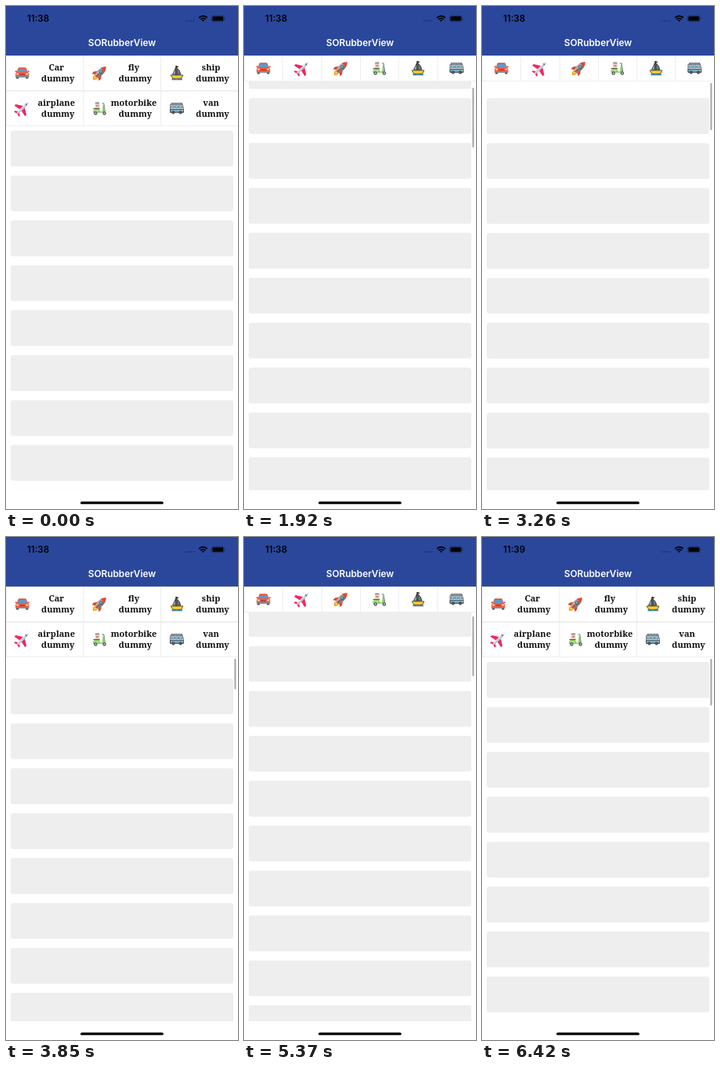
Write an HTML page that moves like this. It is 296 px wide and 640 px high and loops after 6.52 s.

```html
<!DOCTYPE html>
<html lang="en">
<head>
<meta charset="utf-8">
<title>SORubberView</title>
<style>
html, body { margin: 0; width: 100%; height: 100%; overflow: hidden; background: #fff; }
svg { display: block; width: 100vw; height: 100vh; }
.ui { font-family: Inter, "Liberation Sans", sans-serif; font-weight: 600; text-anchor: middle; }
.label { font: 600 11px "Noto Serif", serif; text-anchor: middle; fill: #111; }
.cell { fill: #fff; stroke: #e9e9e9; stroke-width: .7; }
</style>
</head>
<body>
<svg viewBox="0 0 296 640" preserveAspectRatio="none">
  <defs>
    <clipPath id="listClip"><rect y="63" width="296" height="553"/></clipPath>

    <g id="car">
      <path d="M-7.6 4H-4.6V7.2H-7.6ZM4.6 4H7.6V7.2H4.6Z" fill="#444b55"/>
      <path d="M-7.2 0L-5.4-5.6Q-4.9-7-3.6-7H3.6Q4.9-7 5.4-5.6L7.2 0Z" fill="#e9503c"/>
      <path d="M-5.8-1.2L-4.4-5.4H4.4L5.8-1.2Z" fill="#5a9cc9"/>
      <path d="M-9-2.8H-6.8V-1.2H-9ZM6.8-2.8H9V-1.2H6.8Z" fill="#d8432f"/>
      <path d="M-8.6 5.2V1.2Q-8.4-1.2-6.4-1.2H6.4Q8.4-1.2 8.6 1.2V5.2Z" fill="#f05b45"/>
      <path d="M-3.6 1.2H3.6L3 2.8H-3Z" fill="#a83a32"/>
      <rect x="-8.6" y="3.6" width="17.2" height="1.8" rx=".8" fill="#7d8791"/>
      <ellipse cx="-6" cy="1.3" rx="1.6" ry="1.1" fill="#ffe0a0"/>
      <ellipse cx="6" cy="1.3" rx="1.6" ry="1.1" fill="#ffe0a0"/>
    </g>

    <g id="plane" transform="rotate(45)">
      <path d="M0-4L-9.6 2V4.6L0 2.6 9.6 4.6V2Z" fill="#f3265f"/>
      <path d="M0 5.6L-4.4 8.6V10.4L0 9.4 4.4 10.4V8.6Z" fill="#f3265f"/>
      <path d="M0-11.5Q1.6-9 1.6-6V5L.8 9.5H-.8L-1.6 5V-6Q-1.6-9 0-11.5Z" fill="#d5e1ec"/>
      <path d="M0-11.5Q1.6-9 1.6-6V5L.8 9.5H0Z" fill="#b4c5d6"/>
      <path d="M-1.3-7.8H1.3L1-6.6H-1Z" fill="#46627f"/>
    </g>

    <g id="rocket" transform="rotate(45)">
      <path d="M-2.4 5Q-4 9 0 12 4 9 2.4 5Z" fill="#f9a11b"/>
      <path d="M-1.2 5Q-2 8 0 9.6 2 8 1.2 5Z" fill="#ffe067"/>
      <path d="M-3-1L-6.4 4V7.6L-2.4 5ZM3-1L6.4 4V7.6L2.4 5Z" fill="#d8452f"/>
      <path d="M0-11.5Q4-7.5 4-2 4 2 2.6 6H-2.6Q-4 2-4-2-4-7.5 0-11.5Z" fill="#b3adaa"/>
      <path d="M0-11.5Q4-7.5 4-2 4 2 2.6 6H0Z" fill="#827a79"/>
      <path d="M0-11.5Q2.8-8.8 3.6-5.6H-3.6Q-2.8-8.8 0-11.5Z" fill="#e3472f"/>
      <circle cy="-2.4" r="2.2" fill="#464b58"/>
      <circle cy="-2.4" r="1.4" fill="#6bc1ed"/>
      <path d="M-.7 1H.7V7H-.7Z" fill="#c33c2b"/>
    </g>

    <g id="bike">
      <rect x="-5.8" y="-7" width="6" height="6.4" rx="1.2" fill="#e3d6c6"/>
      <path d="M-5.4-7.8H-.4V-6H-5.4Z" fill="#8f8780"/>
      <path d="M-4.4-4.2H-1.4V-2.4H-4.4Z" fill="#e87766"/>
      <path d="M3.2-6.4H5.4L7 4" fill="none" stroke="#66717a" stroke-width="1"/>
      <path d="M-8-.4H.2V.8H-8Z" fill="#55515a"/>
      <path d="M-8.4 5.4Q-8.4.8-5 .8H-.5L.8 4H3.6L4.2-4.4H6L6.6 5.4Z" fill="#84cc57"/>
      <path d="M-7.4 4Q-7 2-4 2H-1.4L-.7 4Z" fill="#b5e391"/>
      <circle cx="-5" cy="6.2" r="2.2" fill="#4b5159"/><circle cx="-5" cy="6.2" r="1" fill="#dde2e5"/>
      <circle cx="6.2" cy="6.2" r="2.2" fill="#4b5159"/><circle cx="6.2" cy="6.2" r="1" fill="#dde2e5"/>
    </g>

    <g id="ship" stroke="#151515" stroke-width=".7" stroke-linejoin="round">
      <path d="M-1.2-9L2-8-1.2-6.8Z" fill="#e24a3c"/>
      <path d="M-1.6-6.6L-5.6 1.8H-1.6Z" fill="#9db0b4"/>
      <path d="M0-6.6Q4.4-3 4.8 1.8H0Z" fill="#6d7d7c"/>
      <path d="M-.9-9V3" fill="none" stroke-width=".9"/>
      <path d="M-7.8 2.6H7.8L5.6 7H-5.2Z" fill="#ffd02e"/>
      <path d="M-6.6 7.6Q-4.4 6.4-2.4 7.6T2 7.6 6.6 7.4V8.8H-6Z" fill="#2f9fe0" stroke-width=".3"/>
    </g>

    <g id="van" stroke="#27313a" stroke-width=".7" stroke-linejoin="round">
      <path d="M-7-6.6H6.6V-5H-7Z" fill="#cfd8dc"/>
      <path d="M-8.4 5V-5H7.2L8.4 0V5Z" fill="#eef2f3"/>
      <path d="M-8.4 1.2H8.4V5H-8.4Z" fill="#78a9c6"/>
      <path d="M-7.2-3.4H-3.2V-.4H-7.2ZM-2.2-3.4H1.6V-.4H-2.2ZM2.6-3.4H6.3L7-.4H2.6Z" fill="#8bd2f2" stroke-width=".5"/>
      <circle cx="-4.6" cy="5.2" r="1.7" fill="#59636b"/>
      <circle cx="4.6" cy="5.2" r="1.7" fill="#59636b"/>
      <path d="M6.8 2H8.1V3.2H6.8Z" fill="#ffd35a" stroke="none"/>
    </g>
  </defs>

  <rect width="296" height="640" fill="#fff"/>
  <g clip-path="url(#listClip)">
    <g id="rows" fill="#eee"></g>
    <rect id="thumb" x="291.4" width="2" rx="1" fill="#000" fill-opacity=".36"/>
  </g>
  <g id="panel"><rect id="panelBack" y="63" width="296" fill="#fff"/></g>

  <rect width="296" height="63" fill="#2a479c"/>
  <text class="ui" id="clock" x="41" y="20" font-size="11.5">11:38</text>
  <g id="dots" fill="#000" fill-opacity=".4"></g>
  <g fill="none" stroke="#000" stroke-width="1.7">
    <path d="M246.2 15Q251.5 10.2 256.8 15M248.2 17.1Q251.5 14.2 254.8 17.1"/>
    <path d="M249.8 18.2Q251.5 16.8 253.2 18.2L251.5 20Z" fill="#000" stroke="none"/>
  </g>
  <rect x="262.3" y="12.2" width="16" height="7.6" rx="2.2" fill="none" stroke="#000" stroke-opacity=".45" stroke-width=".7"/>
  <rect x="263.4" y="13.3" width="13.8" height="5.4" rx="1.3"/>
  <path d="M279.2 14.7Q280.6 16 279.2 17.3Z" fill-opacity=".5"/>
  <text class="ui" x="148" y="51.3" font-size="11.8" fill="#fff">SORubberView</text>
  <rect x="95" y="630.5" width="105.8" height="3.3" rx="1.65"/>
</svg>
<script>
const LOOP = 6520, COL = 296 / 3, HALF = COL / 2, PITCH = 57.15, CONTENT = 3560;
const $ = id => document.getElementById(id);
const mix = (a, b, k) => a + (b - a) * k;
const clamp = v => Math.max(0, Math.min(1, v));

// Eased 0..1 between two times
function ramp(t, from, to) {
  const k = clamp((t - from) / (to - from));
  return k * k * (3 - 2 * k);
}

// Upward travel of the list: swipe up, drift, pull past the top, spring back
function travel(t) {
  const first = 98.5 * ramp(t, 1140, 1700) - 14 * ramp(t, 2030, 2690)
    - 106 * ramp(t, 2800, 3850) + 21.5 * ramp(t, 3960, 4420);
  const second = 99.7 * ramp(t, 4420, 4870) - 22.7 * ramp(t, 4990, 5370)
    - 84 * ramp(t, 5490, 6000) + 6.4 * ramp(t, 6000, 6420);
  return first + second;
}

// 1 = two tall rows, 0 = one strip of icons
function opening(t) {
  return 1 - ramp(t, 1140, 1500) + ramp(t, 3280, 3630)
    - ramp(t, 4480, 4920) + ramp(t, 5630, 5990);
}

function set(el, attrs) {
  for (const name in attrs) el.setAttribute(name, attrs[name]);
}
function add(parent, tag, attrs, text = "") {
  const el = document.createElementNS("http://www.w3.org/2000/svg", tag);
  set(el, attrs);
  el.textContent = text;
  return parent.appendChild(el);
}

for (let i = 0; i < 10; i++)
  add($("rows"), "rect", { x: 6, y: i * PITCH, width: 284, height: 45.6, rx: 3.2 });
for (let i = 0; i < 4; i++)
  add($("dots"), "circle", { cx: 229.8 + 3.2 * i, cy: 18.8, r: .9 });

const items = [
  ["car", "Car"], ["rocket", "fly"], ["ship", "ship"],
  ["plane", "airplane"], ["bike", "motorbike"], ["van", "van"]
];
const cells = items.map(([icon, name], i) => {
  const g = add($("panel"), "g", {});
  const box = add(g, "rect", { class: "cell", x: .4, y: .4 });
  const art = add(g, "use", { href: "#" + icon });
  const label = add(g, "g", { class: "label" });
  add(label, "text", { x: 64.3, y: 19.2 }, name);
  add(label, "text", { x: 66.2, y: 33 }, "dummy");
  return { g, box, art, label, col: i % 3, low: i > 2 };
});

function drawPanel(open) {
  const width = HALF * (1 + open), height = 33 + 12 * open;
  set($("panelBack"), { height: 33 + 57 * open });
  for (const c of cells) {
    const x = c.col * COL + (c.low ? HALF * (1 - open) : 0);
    const y = 63 + (c.low ? 45 * open : 0);
    set(c.g, { transform: `translate(${x} ${y})` });
    set(c.box, { width, height: height - .8 });
    set(c.art, { transform: `translate(${mix(24.7, 20.7, open)} ${mix(16.3, 22.3, open)})` });
    set(c.label, { opacity: clamp(open * 2 - 1) });
  }
}

function draw(t) {
  const moved = travel(t), open = opening(t);
  const bottom = 96 + 57 * open, view = 616 - bottom;
  const scroll = moved - 57 * (1 - open);
  drawPanel(open);
  set($("rows"), { transform: `translate(0 ${158.5 - moved})` });
  set($("thumb"), {
    y: bottom + 2 + Math.max(0, scroll) * view / CONTENT,
    height: view * view / CONTENT + Math.min(0, scroll),
    opacity: t < 1140 ? 0 : 1
  });
  $("clock").textContent = t < 5860 ? "11:38" : "11:39";
}

const start = performance.now();
function tick() {
  draw((performance.now() - start) % LOOP);
  requestAnimationFrame(tick);
}
tick();
</script>
</body>
</html>
```
